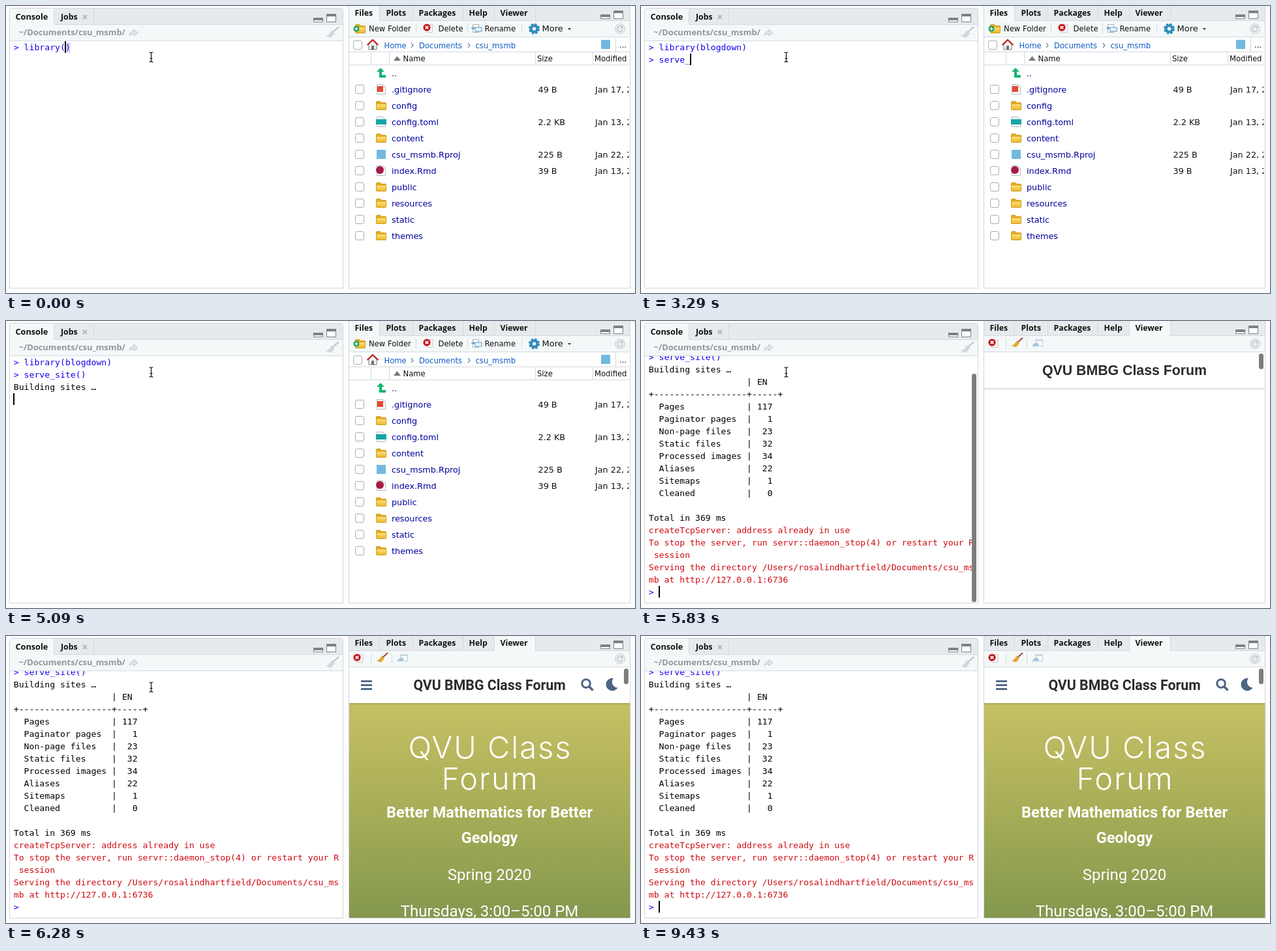
Write an HTML page that moves like this. It is 964x441 px and loops after 9530 ms.

```html
<!DOCTYPE html>
<html lang="en">
<head>
<meta charset="utf-8">
<title>Serving a site from the console</title>
<style>
  html, body { margin: 0; width: 964px; height: 441px; overflow: hidden; background: #fdfdfe; }
  svg { display: block; }
  text { white-space: pre; font: 11.6px "DejaVu Sans", sans-serif; fill: #111; }
  .tab text { font: 700 12.3px "Open Sans", sans-serif; }
  .mono text { font: 13.15px "DejaVu Sans Mono", monospace; }
  .row text { font-size: 12.8px; }
  .row .name { fill: #00009c; }
  .crumb text { fill: #0f5cc4; }
  .hero text { font: 24px Roboto, sans-serif; fill: #fff; text-anchor: middle; }
  .hero .big { font: 300 47px Inter, sans-serif; letter-spacing: 2px; }
  .hero .sub { font-weight: 700; font-size: 23.5px; }
  .brand { font: 700 21.3px "Liberation Sans", Arial, sans-serif; fill: #2b2b2b; text-anchor: middle; }
  .ready .brand { font-family: Roboto, sans-serif; }
  .line { stroke: #d3d9dd; fill: none; }
  .box { fill: #fff; stroke: #a9adb1; }
</style>
</head>
<body>
<svg width="964" height="441" viewBox="0 0 964 441">
  <defs>
    <linearGradient id="field" x2="0" y2="1">
      <stop stop-color="#c6c064"/><stop offset=".5" stop-color="#a7ad57"/><stop offset="1" stop-color="#83984e"/>
    </linearGradient>
    <linearGradient id="gold" x2="0" y2="1">
      <stop stop-color="#fbe07a"/><stop offset="1" stop-color="#edb92e"/>
    </linearGradient>
    <linearGradient id="shade" x2="0" y2="1">
      <stop stop-opacity=".14"/><stop offset="1" stop-opacity="0"/>
    </linearGradient>
    <clipPath id="consoleClip"><path d="M6 54H516V433H6z"/></clipPath>
    <clipPath id="filesClip"><path d="M526 0H954.5V433H526z"/></clipPath>
    <clipPath id="viewerClip"><path d="M526 0H956.5V433H526z"/></clipPath>
    <g id="winButtons">
      <path d="M.5 6.5h14v6h-14z" fill="#fff" stroke="#798188"/><path d="M0 6h15v4H0z" fill="#798188"/>
      <path d="M20.5.5h14v12h-14z" fill="#fff" stroke="#798188"/><path d="M20 0h15v4H20z" fill="#798188"/>
    </g>
    <g id="folder">
      <path d="M.5 13.5V2.5q0-1 1-1h5l2 2h6q1 0 1 1v9q0 1-1 1h-13q-1 0-1-1z" fill="#e5ac25" stroke="#cf9a1d"/>
      <path d="M1 6h14v8H1z" fill="url(#gold)"/>
    </g>
    <g id="page"><path d="M1.5.5h9l4 4v11h-13z" fill="#fff" stroke="#b4b9bd"/><path d="M10.5.5v4h4" class="line"/></g>
    <g id="up"><path d="M7 0 13 6H9v5h6v4H5V6H1z" fill="#13b573"/></g>
    <g id="git"><use href="#page"/><path d="M2 3h9v9H2z" fill="#e8472f"/></g>
    <g id="toml"><use href="#page"/><path d="M0 4h16v8H0z" fill="#16a5a5"/></g>
    <g id="proj"><path d="M1 1h14v14H1z" fill="#72b9de"/></g>
    <g id="rmd"><use href="#page"/><circle cx="6" cy="7" r="6" fill="#a51c42"/></g>
    <g id="check"><rect class="box" x=".5" y=".5" width="13" height="13" rx="2.5"/></g>
    <g id="stop">
      <path d="M5 1.5h10v12H5z" fill="#f5f7f8" stroke="#c6cdd2"/>
      <circle cx="6" cy="6" r="5.6" fill="#c9151e"/><path d="M3.8 3.8l4.4 4.4m0-4.4L3.8 8.2" stroke="#fff" stroke-width="1.8"/>
    </g>
    <g id="refresh" fill="none" stroke="#c5cad0">
      <circle cx="8" cy="8" r="7.5" fill="#eef1f4"/><path d="M11.7 6.2a4.2 4.2 0 1 0 .3 3M12 3v3.7H8.5" stroke-width="1.8"/>
    </g>
    <g id="broom"><path d="M20 0 11 8" stroke-width="2.2"/><path d="M9 5l5 5-6 7-8-3q6-2 9-9z" stroke="none"/></g>
    <path id="beam" d="M-3-7Q0-7 0-5Q0-7 3-7M0-5V6M-3 8Q0 8 0 6Q0 8 3 8M-2 2.5H2" fill="none" stroke="#111" stroke-width="1.2"/>
    <path id="arrow" d="M0 0v15l3.5-3 2.3 5.5 2.4-1-2.3-5.3H11z" fill="#111" stroke="#fff"/>
  </defs>

  <!-- console pane -->
  <path d="M5.5 433.5V6.5q0-3 3-3H513.5q3 0 3 3V433.5z" fill="#fff" stroke="#d0d6da"/>
  <path d="M6 29V7q0-3 3-3H513q3 0 3 3V29z" fill="#e6eaed"/>
  <path d="M6 29H516V53H6z" fill="#f4f8f9"/>
  <path d="M74 28.5H516M6 53.5H516M134.5 5V28" class="line"/>
  <path d="M6 30V7q0-3 3-3H70q3.5 0 3.5 3V30z" fill="#f4f8f9"/><path d="M73.5 7V28" class="line"/>
  <g class="tab">
    <text x="14.5" y="21" style="font-size:12.7px">Console</text><text x="84" y="21">Jobs</text>
    <text x="19.5" y="45" style="font-size:12.9px;fill:#929699">~/Documents/csu_msmb/</text>
  </g>
  <path d="M118 14l6 6m0-6l-6 6" stroke="#b0b5b9" stroke-width="1.8"/>
  <path d="M189 45q1-6 7-6v-3l6 5-6 5v-3q-5 0-7 2z" fill="#e1e6ed" stroke="#bcc4cf"/>
  <use href="#winButtons" x="471" y="12"/>
  <use href="#broom" transform="translate(490 32)" fill="#d4d7da" stroke="#bfc4c8"/>
  <g clip-path="url(#consoleClip)">
    <rect id="match" width="7" height="16" fill="#d9d9f6"/>
    <g id="console" class="mono"></g>
    <rect id="caret" width="2" height="18"/>
  </g>
  <rect id="bar" x="507" y="81" width="7" height="351" rx="3.5" fill="#7d7d7d"/>
  <g id="popup" class="mono"></g>

  <!-- files and viewer pane -->
  <path d="M525.5-2V433.5H956.5V-2z" fill="#fff" stroke="#d0d6da"/>
  <path d="M526 0H956V23H526z" fill="#e6eaed"/>
  <path d="M526 23H956V47H526z" fill="#f4f8f9"/>
  <path d="M526 22.5H956M572.5 0V22M623.5 0V22M700.5 0V22M748.5 0V22M811.5 0V22" class="line"/>
  <rect id="active" y="0" height="24" fill="#f4f8f9"/>
  <g class="tab" id="tabs"></g>
  <use href="#winButtons" x="911" y="7"/>
  <use href="#refresh" x="933" y="27"/>

  <g id="files" clip-path="url(#filesClip)">
    <use href="#folder" x="535" y="27"/><circle cx="537" cy="35" r="4.5" fill="#18a057"/>
    <path d="M534.5 35h5M537 32.5v5" stroke="#fff" stroke-width="1.5"/>
    <use href="#stop" x="639" y="27"/>
    <path d="M715.5 28.5h9v12h-9z" fill="#fff" stroke="#a7b0b8"/><path d="M719 33h10v6H719z" fill="#eef5fb" stroke="#4c93c6"/>
    <path d="M713 34h5m-2-2 2 2-2 2" fill="none" stroke="#2777b8"/>
    <circle cx="809.5" cy="35" r="6.5" fill="none" stroke="#2c8dbd" stroke-width="4" stroke-dasharray="3.1 2"/>
    <circle cx="809.5" cy="35" r="4.8" fill="none" stroke="#2c8dbd" stroke-width="4"/>
    <path d="M861 34h5l-2.5 3z" fill="#333"/>
    <path d="M628.5 27V42M707.5 27V42M790.5 27V42" class="line"/>
    <text x="556" y="39">New Folder</text><text x="662.5" y="39">Delete</text>
    <text x="733.5" y="39">Rename</text><text x="821.5" y="39" style="font-size:13px">More</text>
    <path d="M526 47.5H956M526 70.5H956M526 90.5H956M559.5 71V90M587.5 71V90M811.5 71V90M899.5 71V90M934.5 48V70" class="line"/>
    <use href="#check" x="532" y="53"/>
    <path d="M556 59v8h12v-8l-6-6z" fill="#f7f4f0" stroke="#6f7980"/><path d="M560 61h4v6h-4z" fill="#65707a"/>
    <path d="M553.5 60 562 52l8.5 8" fill="none" stroke="#c22620" stroke-width="2.2"/>
    <g class="crumb"><text x="579.5" y="65">Home</text><text x="633" y="65">Documents</text><text x="719.5" y="65">csu_msmb</text></g>
    <path d="M621 57l3 3.5-3 3.5M708 57l3 3.5-3 3.5" fill="none" stroke="#6a85ac" stroke-width="1.2"/>
    <use href="#proj" x="911" y="51"/><text x="940" y="64">...</text>
    <path d="M594 84h11l-5.5-7z" fill="#777"/>
    <text x="608.5" y="85">Name</text><text x="814" y="85">Size</text><text x="902" y="85">Modified</text>
    <g id="rows"></g>
  </g>

  <g id="viewer" clip-path="url(#viewerClip)">
    <use href="#stop" x="532" y="27"/>
    <use href="#broom" transform="translate(568 26) scale(.85)" fill="#e3a92e" stroke="#9a3d34"/>
    <path d="M604.5 28.5h11v10h-11z" fill="#fff" stroke="#b9cad6"/><path d="M604 28h12v3h-12z" fill="#c5d9e7"/>
    <path d="M600 40q0-6 6-6v-2l4 4-4 4v-2q-4 0-6 2z" fill="#a5c2da"/>
    <path d="M559.5 27V42M591.5 27V42M526 47.5H956" class="line"/>
    <g id="hero" class="hero">
      <path d="M526 103H957V433H526z" fill="url(#field)"/>
      <text class="big" x="742" y="188">QVU Class</text><text class="big" x="742" y="236">Forum</text>
      <text class="sub" x="741" y="279">Better Mathematics for Better</text><text class="sub" x="741" y="318">Geology</text>
      <text x="741" y="375">Spring 2020</text><text x="741" y="431">Thursdays, 3:00–5:00 PM</text>
    </g>
    <g id="head">
      <path d="M526 48H956V103H526z" fill="#fff"/><path d="M526 103H956V107H526z" fill="url(#shade)"/>
      <text class="brand" x="741" y="83">QVU BMBG Class Forum</text>
      <rect x="947" y="50" width="7" height="24" rx="3.5" fill="#7d7d7d"/>
    </g>
    <g id="icons" fill="none" stroke="#34526f">
      <path d="M544 69.5h17M544 75.5h17M544 81.5h17" stroke-width="2.6"/>
      <circle cx="889" cy="73" r="6.3" stroke="#4b6584" stroke-width="3"/><path d="M893.5 77.5l6 6" stroke="#4b6584" stroke-width="3.6"/>
      <path d="M931 65A9.7 9.7 0 1 0 937.5 79.5A8.8 8.8 0 0 1 931 65z" fill="#4b6584" stroke="none"/>
    </g>
  </g>
  <use id="mouse"/>
</svg>

<script>
const LOOP = 9530, PITCH = 7.92, LEFT = 12, LEADING = 19;
const el = id => document.getElementById(id);
const text = (x, y, s, attrs = '') => `<text x="${x}" y="${y}" ${attrs}>${s.replace(/</g, '&lt;')}</text>`;
const show = (id, on) => el(id).setAttribute('display', on ? 'inline' : 'none');
const place = (id, attrs) => { for (const k in attrs) el(id).setAttribute(k, attrs[k]); };

el('tabs').innerHTML = [[534.5, 'Files'], [582.5, 'Plots'], [632.5, 'Packages'], [709.5, 'Help'], [757.5, 'Viewer']]
  .map(([x, s]) => text(x, 15, s)).join('');

const files = [
  ['up', '..'], ['git', '.gitignore', '49 B', 'Jan 17, 2020'], ['folder', 'config'],
  ['toml', 'config.toml', '2.2 KB', 'Jan 13, 2020'], ['folder', 'content'],
  ['proj', 'csu_msmb.Rproj', '225 B', 'Jan 22, 2020'], ['rmd', 'index.Rmd', '39 B', 'Jan 13, 2020'],
  ['folder', 'public'], ['folder', 'resources'], ['folder', 'static'], ['folder', 'themes']
];
el('rows').innerHTML = files.map(([icon, name, size = '', date = ''], i) => {
  const y = 103 + 25 * i;
  return `<g class="row">${i ? `<use href="#check" x="535" y="${y - 7}"/>` : ''}<use href="#${icon}" x="567" y="${y - 8}"/>` +
    text(591, y + 5, name, 'class="name"') + text(815.5, y + 5, size) + text(903, y + 5, date) + '</g>';
}).join('');

// Console states: start time, text with "|" as the caret, completion items
const first = '> library(blogdown)\n';
const done = first + '> serve_site()\n';
const packages = ['base', 'BH', 'bibtex', 'BiocManager', 'blob', 'blogdown', 'bookdown'];
const blo = ['blob', 'blogdown'], site = ['serve_site'];
const steps = [
  [0, '> library(|)'], [150, '> library(b|)', packages], [290, '> library(bl|)', blo], [440, '> library(blo|)', blo],
  [1040, '> library(blogdown|)'], [1640, first + '|'], [1790, first + '> |'],
  ...[...'serve'].map((_, i) => [2390 + 150 * i, first + '> ' + 'serve'.slice(0, i + 1) + '|']),
  [3290, first + '> serve_|'], [3590, first + '> serve_s|', site], [3890, first + '> serve_si|', site],
  [4040, first + '> serve_sit|', site], [4190, first + '> serve_site(|)'], [4490, first + '> serve_site()|'],
  [4940, done + '|'], [5090, done + 'Building sites …\n|']
];

const counts = { 'Pages': 117, 'Paginator pages': 1, 'Non-page files': 23, 'Static files': 32,
  'Processed images': 34, 'Aliases': 22, 'Sitemaps': 1, 'Cleaned': 0 };
const report = [
  ' '.repeat(19) + '| EN', '+' + '-'.repeat(18) + '+-----+',
  ...Object.entries(counts).map(([k, n]) => '  ' + k.padEnd(17) + '| ' + String(n).padStart(3)),
  '', 'Total in 369 ms', '!createTcpServer: address already in use',
  '!To stop the server, run servr::daemon_stop(4) or restart your R', '! session',
  '!Serving the directory /Users/rosalindhartfield/Documents/csu_ms', '!mb at http://127.0.0.1:6736', '> |'
].join('\n');
steps.push([5380, done + 'Building sites …\n' + report]);

function drawPopup(items, row) {
  if (!items) return '';
  const fn = items === site, wide = fn || items === packages;
  const x = fn ? 19 : 83, y = 74 + LEADING * row, w = wide ? 221 : 158, h = 24.6;
  return `<rect x="${x + .5}" y="${y + .5}" width="${w}" height="${items.length * h + 2}" fill="#fff" stroke="#b9bec3"/>` +
    `<rect x="${x + 2}" y="${y + 2}" width="${w - 3}" height="${h - 1}" fill="#d5e3f5"/>` +
    items.map((s, i) => text(x + 22, y + 18 + h * i, s)).join('') +
    (fn ? text(x + 124, y + 18, '{blogdown}', 'fill-opacity=".5"') : '');
}

let current;
function drawConsole(step) {
  if (step === current) return;
  current = step;
  const [at, source, items] = step, shift = at >= 5380 ? -27 : 0;
  const lines = source.split('\n');
  // only the caret line ends in a bar; table bars stay
  const row = lines.findIndex(s => s.endsWith('|') || s.endsWith('|)'));
  const col = lines[row].lastIndexOf('|'), nextIsParen = lines[row][col + 1] === ')';
  lines[row] = lines[row].slice(0, col) + lines[row].slice(col + 1);
  const base = i => 68 + LEADING * i + shift, x = LEFT + PITCH * col;
  el('console').innerHTML = lines.map((s, i) => {
    const red = s[0] === '!', color = red ? '#cf0a10' : s[0] === '>' ? '#1400f0' : '#000';
    return text(LEFT - .2, base(i), red ? s.slice(1) : s, `style="fill:${color}"`);
  }).join('');
  place('caret', { x: Math.round(x - .8), y: base(row) - 14 });
  place('match', { x: x + .5, y: base(row) - 12 });
  show('match', nextIsParen);
  el('popup').innerHTML = drawPopup(items, row);
}

const blinks = [6130, 6420, 7020, 7470, 7910, 8500, 8950, 9430];
const mix = (a, b, k) => a + (b - a) * k;

function drawMouse(t) {
  const n = Math.floor((t - 7020) / 148.4) + 1;
  let x = 222.5, y = 78;
  if (n > 8) {
    x = mix(780, 834, (n - 8) / 5);
    y = mix(6, 40, (n - 8) / 5);
  } else if (n > 0) {
    const k = n / 8, e = k * k * (3 - 2 * k);
    x = mix(222, 780, e);
    y = mix(78, 6, e);
  }
  show('mouse', n < 14);
  place('mouse', { href: x < 505 && y > 54 ? '#beam' : '#arrow', x, y });
}

function draw(t) {
  const viewing = t >= 5530, loaded = t >= 6130;
  drawConsole(steps.filter(s => s[0] <= t).pop());
  show('caret', blinks.filter(b => b <= t).length % 2 === 0);
  show('bar', t >= 5380 && t < 6280);
  place('bar', { opacity: loaded ? .5 : 1 });
  place('active', viewing ? { x: 749, width: 62 } : { x: 526, width: 46 });
  show('files', !viewing);
  show('viewer', viewing);
  show('head', t >= 5830);
  show('hero', loaded);
  show('icons', loaded);
  el('viewer').classList.toggle('ready', loaded);
  drawMouse(t);
}

const start = performance.now();
function tick() {
  draw((performance.now() - start) % LOOP);
  requestAnimationFrame(tick);
}
tick();
</script>
</body>
</html>
```
